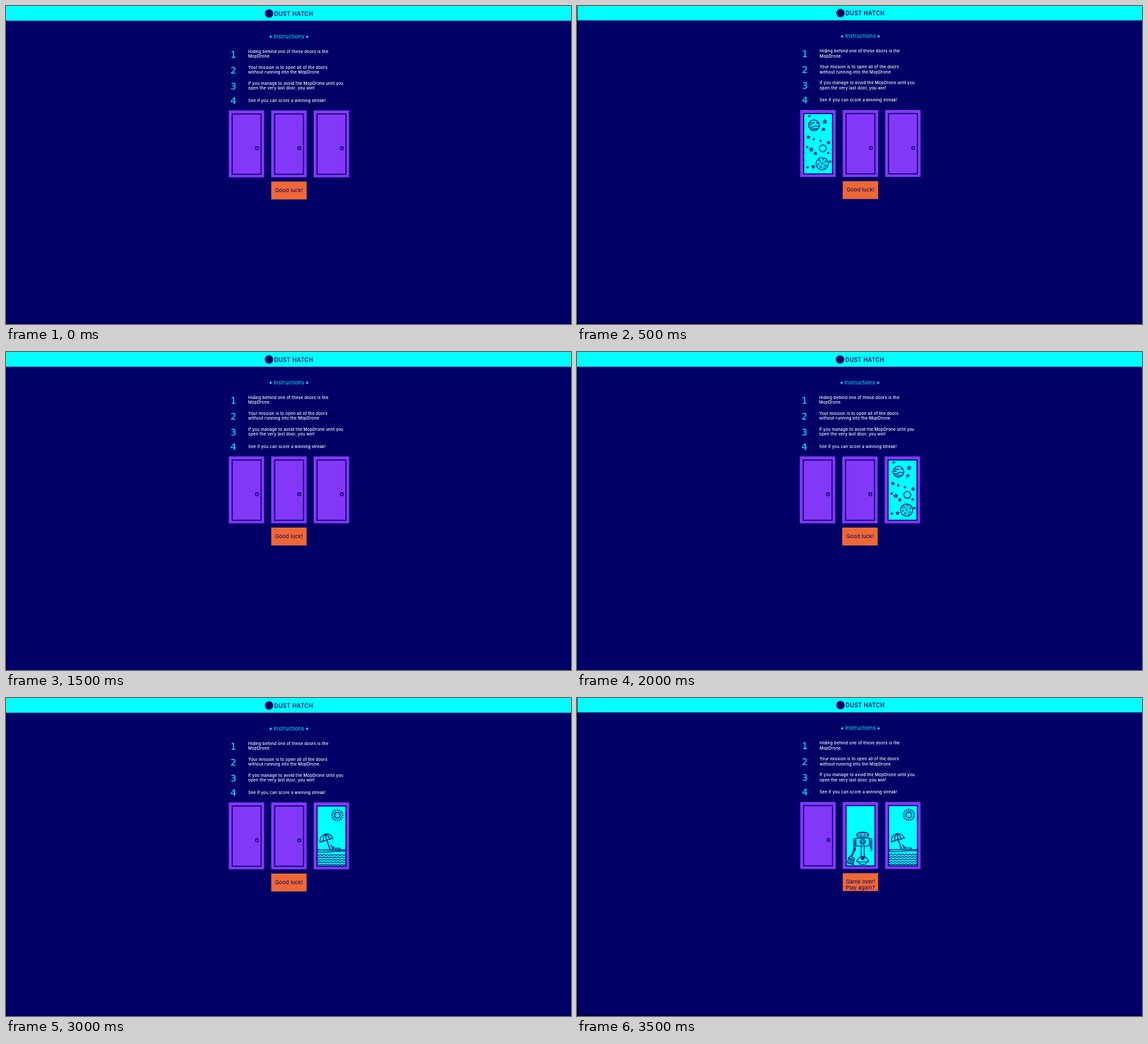
These frames come from a looping animation (854 px wide and 480 px high, 4 s). An HTML page:

```html
<!DOCTYPE html>
<html lang="en">
<head>
<meta charset="utf-8">
<title>Door game</title>
<style>
html, body { margin: 0; width: 100%; height: 100%; overflow: hidden; background: #000; }
svg { display: block; width: 854px; height: 480px; }
text { font-family: Inter, sans-serif; }
.num { font-family: "DejaVu Sans", sans-serif; }
</style>
</head>
<body>
<svg id="stage" viewBox="0 0 854 480"></svg>
<script>
const NAVY = '#000066', CYAN = '#00ffff', PURPLE = '#8338f8', ORANGE = '#ee6737';
const NS = 'http://www.w3.org/2000/svg';
const stage = document.getElementById('stage');

function add(parent, tag, attrs, content) {
  const el = document.createElementNS(NS, tag);
  for (const k in attrs) el.setAttribute(k, attrs[k]);
  if (content) el.textContent = content;
  parent.appendChild(el);
  return el;
}
const group = (parent, attrs) => add(parent, 'g', attrs || {});
const rect = (p, x, y, width, height, fill) => add(p, 'rect', { x, y, width, height, fill });
const circle = (p, cx, cy, r, more) => add(p, 'circle', { cx, cy, r, ...more });
const path = (p, d, more) => add(p, 'path', { d, ...more });
const label = (p, x, y, size, fill, str, more) =>
  add(p, 'text', { x, y, 'font-size': size, fill, ...more }, str);

function starPath(x, y, r) {
  let d = '';
  for (let i = 0; i < 10; i++) {
    const a = -Math.PI / 2 + i * Math.PI / 5, q = i % 2 ? r * 0.45 : r;
    d += (i ? 'L' : 'M') + (x + q * Math.cos(a)).toFixed(2) + ' ' + (y + q * Math.sin(a)).toFixed(2);
  }
  return d + 'Z';
}

function seeded(seed) {
  return () => (seed = (seed * 16807) % 2147483647) / 2147483647;
}

// Scenes use coordinates relative to the door's top left corner
function drawSpace(p) {
  const rnd = seeded(77);
  for (let i = 0; i < 46; i++)
    circle(p, 7.5 + rnd() * 39, 8 + rnd() * 86, 0.45, { fill: NAVY, stroke: 'none' });
  const solid = { fill: CYAN };
  circle(p, 20.8, 23, 8.2, solid);
  path(p, 'M13.5 19.3H22M24 19.3H27.8M12.8 22.2H18M20 24.2H28.8M13 26H21M15 28.6H26');
  circle(p, 34.2, 58, 5.2, solid);
  circle(p, 33.2, 81, 9.3, solid);
  [[29, 76.5, 1.6], [34.5, 74.5, 1.1], [38.5, 78, 1.5], [33, 80.5, 1.7], [27.2, 82, 1.2],
   [37.8, 84.2, 1.7], [31, 86, 1.6], [36, 88, 0.8]].forEach(c => circle(p, ...c, { 'stroke-width': 0.8 }));
  [[37.1, 17.5, 3], [35.1, 29.2, 2.2], [12.6, 41, 2.2], [42.8, 49.2, 2.3], [16.8, 59.6, 2.9],
   [23, 65.6, 2.1], [19.6, 85.6, 2.4]].forEach(s => path(p, starPath(...s), solid));
  [[13.7, 9.2], [20.4, 44], [30.7, 46.4], [10.6, 56], [42.1, 65], [45.2, 78], [11, 86.5]]
    .forEach(c => circle(p, ...c, 1.2, solid));
}

function drawRobot(p) {
  // head
  path(p, 'M25 46.3Q30.2 44.2 35.4 46.3M24.3 46.5H36.1Q38 46.5 38 49.2T36.1 52H24.3Q22.4 52 22.4 49.2T24.3 46.5Z');
  path(p, 'M25.3 49.9Q27 47.5 28.7 49.9M31.7 49.9Q33.4 47.5 35.1 49.9M22.3 48H21.3V51H22.3M38.1 48H39.1V51H38.1M28 52V54.3M32.4 52V54.3');
  // body and arms
  path(p, 'M20 54.3H40.4V66.2H20Z');
  circle(p, 30.2, 60, 4);
  circle(p, 30.2, 60, 2);
  path(p, 'M20 55.5H16.5V72.8M20 58H18.6V72.8M15.8 73.5H19.4M40.4 55.5H44V73.5H41.8M40.4 58H42V69.8M44 69.8H41.8');
  // column and wheel
  path(p, 'M28 66.2V82M32.6 66.2V82M21.2 90.2A9.2 9.2 0 0 1 39.4 90.2ZM23.8 90.4A6.7 5 0 0 0 36.8 90.4');
  path(p, 'M28 81V84.4A2.3 2.3 0 0 0 32.6 84.4V81');
  circle(p, 30.3, 84.3, 1);
  // broom
  path(p, 'M19.6 69.5L14.2 82.5M17.8 69L12.7 81.8M10.6 81.8L18 85L17 87.6L9.2 84.4ZM9.2 84.4L7 91.6L16.2 94.5L17 87.6M11.2 86L9.7 92M13.2 87L12.2 92.8M15.2 88L14.3 93.6');
}

function drawBeach(p) {
  circle(p, 35.8, 19.4, 4.2, { 'stroke-width': 1.4 });
  let d = '';
  for (let i = 0; i < 16; i++) {
    const a = i * Math.PI / 8, c = Math.cos(a), s = Math.sin(a);
    d += `M${35.8 + 6.4 * c} ${19.4 + 6.4 * s}L${35.8 + 9.4 * c} ${19.4 + 9.4 * s}`;
  }
  path(p, d, { 'stroke-width': 1.4 });
  // parasol
  path(p, 'M9.8 60.6C8.7 53.5 12.7 48.7 18 47.9C23.3 47.1 28 50.2 29 55.1Q26.6 53.7 24.6 56.1Q21.9 54.7 19.6 57.4Q16.7 56.4 14.5 59Q11.9 58.3 9.8 60.6Z');
  path(p, 'M18 48Q13.7 52 14.5 59M18 48Q18.7 52 19.6 57.4M18 48Q23.4 50.8 24.6 56.1M17.8 48L17.4 46.7');
  path(p, 'M20 57.3L25 71.4', { 'stroke-width': 1.5 });
  // lounger
  path(p, 'M25.9 63.8L28.8 69.2H39.8V71.6M28.8 69.2L27.8 71.6M28.8 67.2H31.2');
  path(p, 'M5 71.8H49M5 74.4Q18 75.6 27 74.3T49 73.7');
  // water
  for (let row = 0; row < 5; row++) {
    let w = '';
    for (let x = 5; x <= 49; x += 0.5)
      w += (w ? 'L' : 'M') + x + ' ' + (79.3 + row * 3.7 + 0.7 * Math.sin(x * 1.14)).toFixed(2);
    path(p, w);
  }
}

const scenes = { space: drawSpace, robot: drawRobot, beach: drawBeach };

rect(stage, 0, 0, 854, 480, '#000');
const world = group(stage);
rect(world, 0, 0, 856, 480, NAVY);
rect(world, 0, -2, 856, 24.3, CYAN);
circle(world, 397.6, 11.3, 6.4, { fill: NAVY });
label(world, 405.4, 14.7, 8.4, NAVY, 'DUST HATCH', { 'font-weight': 600, 'letter-spacing': 0.45 });

label(world, 427.7, 48.6, 8, CYAN, 'Instructions', { 'text-anchor': 'middle', 'letter-spacing': 0.17 });
[400, 455.2].forEach(x => path(world, starPath(x, 46.4, 2.5), { fill: CYAN }));

[
  [71.1, 77.5, 'Hiding behind one of these doors is the', 'MopDrone.'],
  [95.1, 101.6, 'Your mission is to open all of the doors', 'without running into the MopDrone.'],
  [119.1, 125.7, 'If you manage to avoid the MopDrone until you', 'open the very last door, you win!'],
  [144.8, 147.7, 'See if you can score a winning streak!']
].forEach(([y, numY, ...lines], i) => {
  label(world, 339.2, numY, 14, CYAN, String(i + 1), { class: 'num' });
  lines.forEach((s, n) => label(world, 366, y + n * 7.1, 6.2, '#fff', s,
    { 'font-weight': 500, 'letter-spacing': 0.14 }));
});

const doors = [0, 1, 2].map(i => {
  const g = group(world, { transform: `translate(${336.7 + i * 64.15} 157.6)` });
  rect(g, 0, 0, 53.6, 101, PURPLE);
  const panel = add(g, 'rect', { x: 5.2, y: 5.4, width: 43.6, height: 91, stroke: NAVY, 'stroke-width': 1.5 });
  const views = { closed: group(g) };
  circle(views.closed, 42.6, 57.2, 2.3, { fill: 'none', stroke: NAVY, 'stroke-width': 1.3 });
  for (const name in scenes) {
    views[name] = group(g, { fill: 'none', stroke: NAVY, 'stroke-width': 1.15, 'stroke-linejoin': 'round' });
    scenes[name](views[name]);
  }
  return { panel, views };
});

rect(world, 400.9, 265, 53.6, 27, ORANGE);
const buttonText = (y, size, s) =>
  label(world, 427.8, y, size, NAVY, s, { 'text-anchor': 'middle', 'letter-spacing': 0.14 });
const luck = buttonText(280.7, 8, 'Good luck!');
const over = [buttonText(280.6, 7.9, 'Game over!'), buttonText(289.8, 7.9, 'Play again?')];

// Each step lasts half a second: three doors, then whether the view is nudged
const shut = 'closed';
const steps = [
  [shut, shut, shut, 0],
  ['space', shut, shut, 1],
  ['space', 'robot', shut, 1],
  [shut, shut, shut, 0],
  [shut, shut, 'space', 0],
  ['robot', shut, 'space', 1],
  [shut, shut, 'beach', 0],
  [shut, 'robot', 'beach', 1]
];
const show = (el, on) => el.setAttribute('visibility', on ? 'visible' : 'hidden');

function render(ms) {
  const step = steps[Math.floor((ms % 4000) / 500)];
  const lost = step.includes('robot');
  world.setAttribute('transform', step[3] ? 'translate(0.7 -0.6)' : 'translate(0 0)');
  doors.forEach(({ panel, views }, i) => {
    panel.setAttribute('fill', step[i] === shut ? PURPLE : CYAN);
    for (const name in views) show(views[name], name === step[i]);
  });
  show(luck, !lost);
  over.forEach(el => show(el, lost));
}

const start = performance.now();
function tick() {
  render(performance.now() - start);
  requestAnimationFrame(tick);
}
render(0);
requestAnimationFrame(tick);
</script>
</body>
</html>
```
